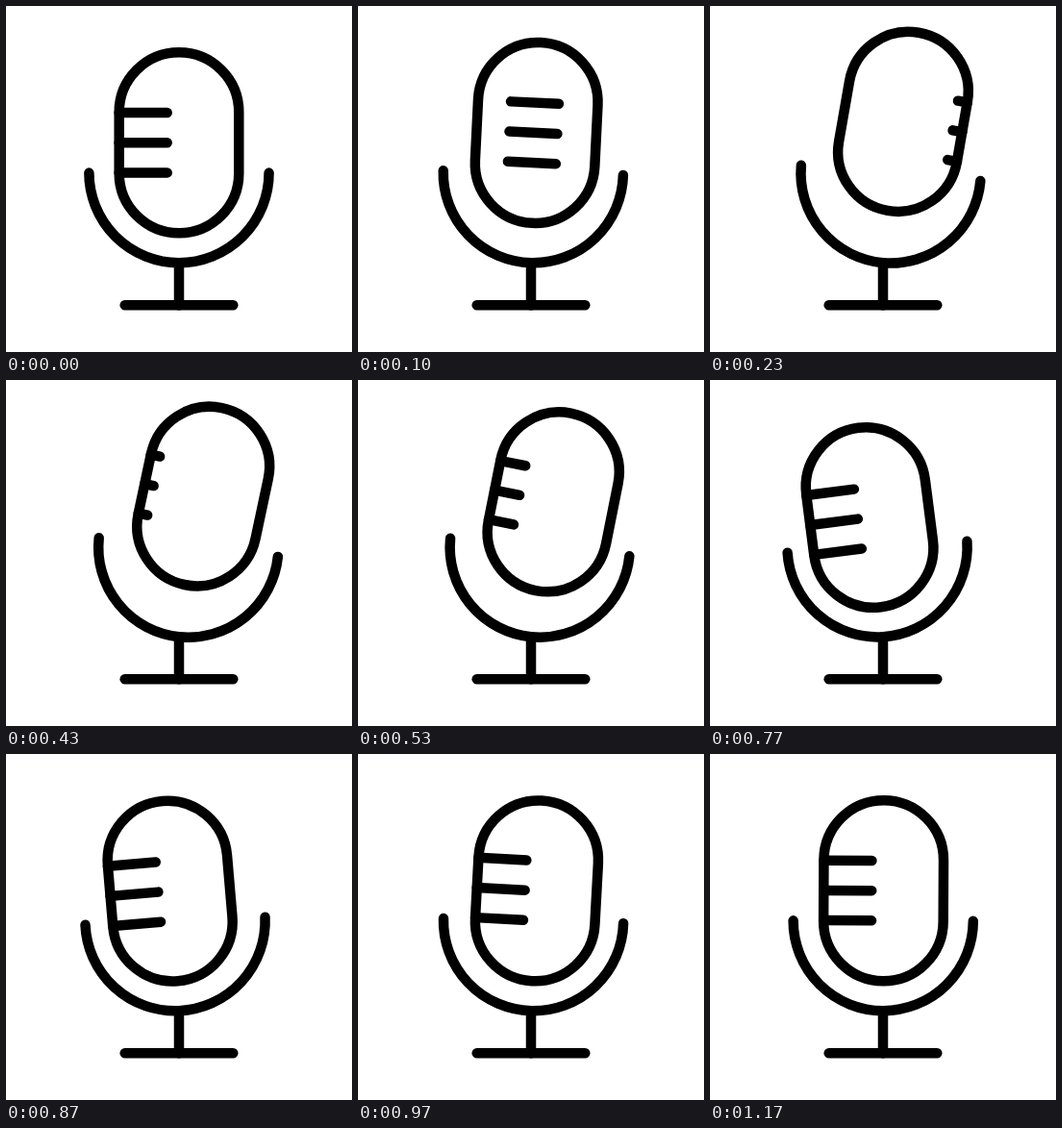
Write an HTML page with a canvas that moves like this. It is 360 px wide and 360 px high and loops after 1.2 s.

```html
<!DOCTYPE html>
<html lang="en">
<head>
<meta charset="utf-8">
<title>Microphone</title>
<style>
  html, body { margin: 0; width: 100%; height: 100%; overflow: hidden; background: #fff; }
  canvas { display: block; width: 100vw; height: 100vh; }
</style>
</head>
<body>
<canvas id="stage" width="360" height="360"></canvas>
<script>
const ctx = document.getElementById('stage').getContext('2d');
const LOOP = 1200, STEPS = 36;
const MID = 180, ARC_R = 93.6, ARC_BOTTOM = 267.2;
const HEAD_R = 62.3, HEAD_H = 188, HEAD_BOTTOM = 236.2;
const LINE_LEN = 50;

// Keys are [step, value] pairs with smooth easing in between.
const SWAY = [[0, 0], [9.5, 6], [15, 6], [24, -4], [30, 2], [36, 0]];
const LIFT = [[0, 0], [6.5, 23.5], [14, 23.5], [20, 0]];
const EXIT = [[0, -HEAD_R], [9, 69]];
const ENTER = [[9.5, -HEAD_R - LINE_LEN], [22, -HEAD_R]];

function valueAt(keys, step) {
  const next = keys.findIndex(key => key[0] > step);
  if (next < 0) return keys[keys.length - 1][1];
  if (next === 0) return keys[0][1];
  const [t0, v0] = keys[next - 1], [t1, v1] = keys[next];
  const p = (step - t0) / (t1 - t0);
  return v0 + (v1 - v0) * p * p * (3 - 2 * p);
}

function line(x1, y1, x2, y2) {
  ctx.beginPath();
  ctx.moveTo(x1, y1);
  ctx.lineTo(x2, y2);
  ctx.stroke();
}

function drawHead(step) {
  ctx.beginPath();
  ctx.roundRect(-HEAD_R, -HEAD_H, HEAD_R * 2, HEAD_H, HEAD_R);
  ctx.stroke();

  const start = valueAt(step < 9.5 ? EXIT : ENTER, step);
  const left = Math.max(start, -HEAD_R);
  const right = Math.min(start + LINE_LEN, HEAD_R);
  if (left >= right) return;
  for (const offset of [-31.2, 0, 31.2]) {
    const y = offset - HEAD_H / 2;
    line(left, y, right, y);
  }
}

function draw(step) {
  const angle = valueAt(SWAY, step) * Math.PI / 180;
  ctx.fillStyle = '#fff';
  ctx.fillRect(0, 0, 360, 360);
  ctx.strokeStyle = '#000';
  ctx.lineWidth = 10.5;
  ctx.lineCap = 'round';

  line(MID, ARC_BOTTOM, MID, 311.3);
  line(123.7, 311.3, 236.3, 311.3);

  ctx.save();
  ctx.translate(MID, ARC_BOTTOM);
  ctx.rotate(angle);
  ctx.beginPath();
  ctx.arc(0, -ARC_R, ARC_R, 0, Math.PI);
  ctx.stroke();

  // The head leans as much again around its own lower end.
  ctx.translate(0, HEAD_BOTTOM - ARC_BOTTOM - valueAt(LIFT, step));
  ctx.rotate(angle);
  drawHead(step);
  ctx.restore();
}

function tick() {
  const time = performance.now() % LOOP;
  draw(Math.floor((time + 4) * STEPS / LOOP) % STEPS);
  requestAnimationFrame(tick);
}
tick();
</script>
</body>
</html>
```
